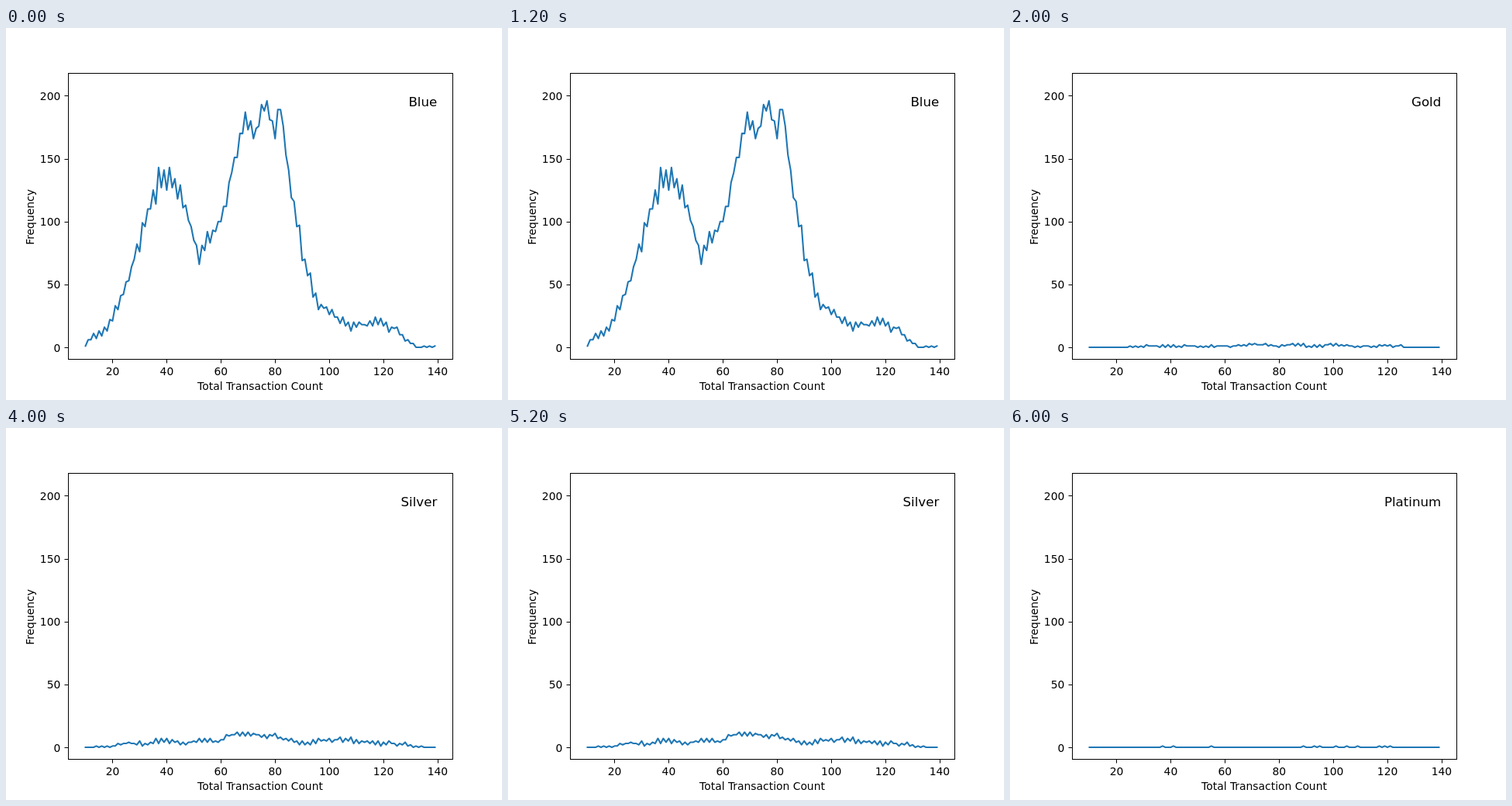
Write an HTML page with a canvas that moves like this. It is 640x480 px and loops after 8 s.

```html
<!DOCTYPE html>
<html lang="en">
<head>
<meta charset="utf-8">
<title>Transaction count by card</title>
<style>
  html, body { margin: 0; width: 100%; height: 100%; overflow: hidden; background: #fff; }
  canvas { display: block; }
</style>
</head>
<body>
<canvas id="chart" width="640" height="480"></canvas>
<script>
const ctx = document.getElementById('chart').getContext('2d');

const FONT = '"DejaVu Sans", sans-serif';
const PT = 100 / 72;
const HOLD = 2000;
const FIRST = 10, LAST = 139;

const px = count => 102.545 + (count - FIRST) * 3.49542;
const py = freq => 411.95 - freq * 1.6225;

// `trend` holds [count, frequency] key points of the smooth curve.
// `jitter` scales the noise; its sign picks whether odd or even counts rise.
const cards = [
  {
    name: 'Blue', jitter: 1,
    trend: [
      [10, 3], [18, 16], [24, 43], [31, 92], [37, 132], [43, 132], [48, 102],
      [52, 73], [60, 102], [65, 150], [69, 183], [72, 168], [76, 190],
      [80, 176], [82, 190], [85, 137], [90, 76], [95, 38], [100, 27],
      [108, 16], [117, 20], [124, 15], [132, 0], [139, 0.4]
    ]
  },
  {
    name: 'Gold', jitter: 1.1,
    trend: [
      [10, 0], [20, 0], [32, 0.9], [57, 0.7], [67, 1.9], [73, 2.4],
      [79, 0.8], [87, 2.4], [92, 0.6], [98, 2.1], [110, 0.5], [124, 1.4],
      [128, 0], [139, 0]
    ]
  },
  {
    name: 'Silver', jitter: -1.1,
    trend: [
      [10, 0], [20, 0.6], [25, 3.5], [33, 2.5], [38, 6], [46, 3], [55, 6],
      [59, 4], [64, 10], [70, 10.5], [81, 8.5], [91, 2.4], [98, 6],
      [106, 6.5], [112, 4.5], [127, 2.4], [132, 0.6], [139, 0]
    ]
  },
  {
    name: 'Platinum', jitter: 1.5,
    trend: [[10, 0.05], [28, 0.1], [84, 0.1], [94, 0.2], [106, 0.15], [139, 0.08]]
  }
];

function trendAt(trend, n) {
  const i = trend.findIndex(([count]) => count >= n);
  const [n1, f1] = trend[i];
  const [n0, f0] = trend[Math.max(i - 1, 0)];
  return n === n1 ? f1 : f0 + (f1 - f0) * (n - n0) / (n1 - n0);
}

function random(n) {
  const v = Math.sin(n * 12.9898) * 43758.5453;
  return v - Math.floor(v);
}

// Counts scatter around the trend by about its square root.
function frequency({ trend, jitter }, n) {
  const mean = trendAt(trend, n);
  const side = n % 2 ? 1 : -1;
  return Math.max(0, Math.round(mean + side * jitter * random(n) * Math.sqrt(mean)));
}

function text(str, x, y, align, size = 10) {
  ctx.font = `${size * PT}px ${FONT}`;
  ctx.textAlign = align;
  ctx.fillText(str, x, y);
}

function segment(x1, y1, x2, y2) {
  ctx.beginPath();
  ctx.moveTo(x1, y1);
  ctx.lineTo(x2, y2);
  ctx.stroke();
}

function drawAxes() {
  ctx.fillStyle = ctx.strokeStyle = '#000';
  ctx.lineWidth = 1;
  ctx.lineCap = 'butt';
  ctx.lineJoin = 'miter';

  for (let n = 20; n <= 140; n += 20) {
    const x = Math.round(px(n) - 0.01) + 0.5;
    segment(x, 427.5, x, 432.5);
    text(n, px(n), 448, 'center');
  }
  for (let f = 0; f <= 200; f += 50) {
    const y = Math.round(py(f)) + 0.5;
    segment(75.5, y, 80.5, y);
    text(f, 70.3, Math.round(py(f) + 5.6), 'right');
  }
  ctx.strokeRect(80.5, 58.5, 496, 369);

  text('Total Transaction Count', 328, 467, 'center');
  ctx.save();
  ctx.translate(36, 244);
  ctx.rotate(-Math.PI / 2);
  text('Frequency', 0, 0, 'center');
  ctx.restore();
}

function drawCurve(card) {
  ctx.strokeStyle = '#1f77b4';
  ctx.lineWidth = 1.5 * PT;
  ctx.lineCap = 'square';
  ctx.lineJoin = 'round';
  ctx.beginPath();
  for (let n = FIRST; n <= LAST; n++) ctx.lineTo(px(n), py(frequency(card, n)));
  ctx.stroke();
}

function draw() {
  const card = cards[Math.floor(performance.now() / HOLD) % cards.length];
  ctx.fillStyle = '#fff';
  ctx.fillRect(0, 0, 640, 480);
  drawCurve(card);
  drawAxes();
  text(card.name, 556.3, 101, 'right', 12);
  requestAnimationFrame(draw);
}

draw();
</script>
</body>
</html>
```
